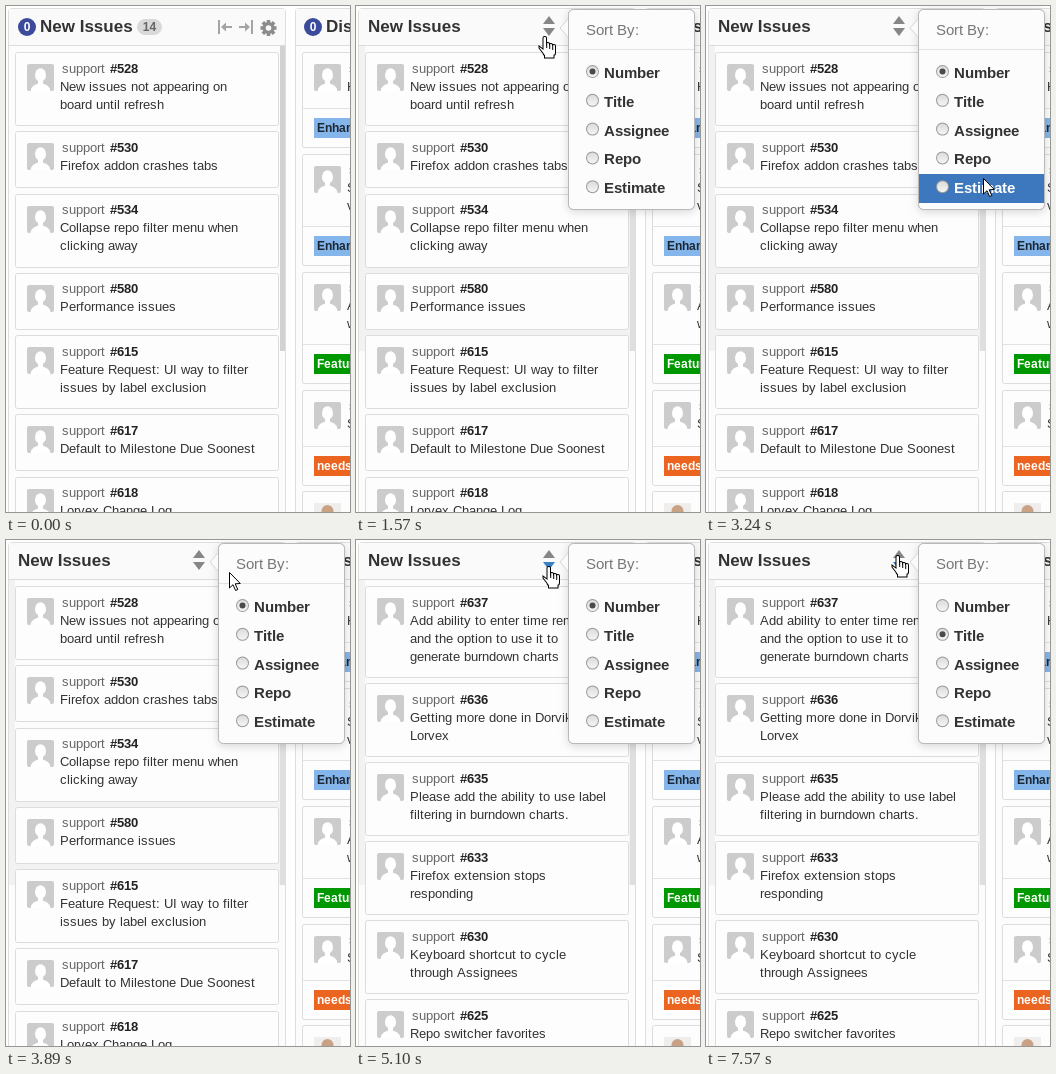
These frames come from a looping animation (344x506 px, 8000 ms). An HTML page with a canvas:

```html
<!DOCTYPE html>
<html lang="en">
<head>
<meta charset="utf-8">
<title>Sorting issues on a board</title>
<style>
html, body { margin: 0; width: 100%; height: 100%; overflow: hidden; background: #fff; }
canvas { display: block; }
</style>
</head>
<body>
<canvas id="stage" width="344" height="506"></canvas>
<script>
const ctx = document.getElementById('stage').getContext('2d');
const FONT = '"Liberation Sans", Arial, sans-serif';
const LOOP = 8000, TICK = 120;
const HOVER_AT = 800, POPUP_AT = 1570, RESORT_AT = 5100, SELECT_AT = 6550;
const ROW = 28.8;
const EDGE = '#dcdcdc', PAPER = '#fdfdfd', BLUE = '#3d77bd';

const ascending = [
  ['#528', 'New issues not appearing on', 'board until refresh'],
  ['#530', 'Firefox addon crashes tabs'],
  ['#534', 'Collapse repo filter menu when', 'clicking away'],
  ['#580', 'Performance issues'],
  ['#615', 'Feature Request: UI way to filter', 'issues by label exclusion'],
  ['#617', 'Default to Milestone Due Soonest'],
  ['#618', 'Lorvex Change Log']
];
const descending = [
  ['#637', 'Add ability to enter time remaining', 'and the option to use it to', 'generate burndown charts'],
  ['#636', 'Getting more done in Dorvik', 'Lorvex'],
  ['#635', 'Please add the ability to use label', 'filtering in burndown charts.'],
  ['#633', 'Firefox extension stops', 'responding'],
  ['#630', 'Keyboard shortcut to cycle', 'through Assignees'],
  ['#625', 'Repo switcher favorites']
];
const sideCards = [
  { lines: ['H'], label: 'Enhancement', fill: '#84b6eb', ink: '#1c2733' },
  { lines: ['S', 'v'], label: 'Enhancement', fill: '#84b6eb', ink: '#1c2733' },
  { lines: ['A', 'w'], label: 'Feature', fill: '#009800', ink: '#fff' },
  { lines: ['S'], label: 'needs', fill: '#eb6420', ink: '#fff' }
];
const options = ['Number', 'Title', 'Assignee', 'Repo', 'Estimate'];

// Pointer moves: start, end, target x, target y
const moves = [
  [660, 1570, 189, 30], [1570, 1720, 191, 27],
  [2190, 2550, 258, 72], [2550, 3240, 277, 172],
  [3260, 3890, 223, 32], [3920, 4160, 204, 17], [4190, 4670, 193, 26],
  [5380, 5620, 227, 31], [5650, 6130, 267, 106], [6280, 6400, 268, 99],
  [6860, 7110, 234, 27], [7140, 7260, 196, 17], [7450, 7570, 192, 15]
];

const pitch = lines => [62.5, 79, 97][lines.length - 1];
const easeOut = p => 1 - (1 - p) ** 3;

function pointerAt(t) {
  let x = 0, y = 70;
  for (const [start, end, toX, toY] of moves) {
    if (t < start) break;
    const stepped = Math.floor((t - start) / TICK) * TICK;
    const p = t >= end ? 1 : easeOut(stepped / (end - start));
    x += (toX - x) * p;
    y += (toY - y) * p;
  }
  return { x: Math.round(x), y: Math.round(y) };
}

function rect(x, y, w, h, color) {
  ctx.fillStyle = color;
  ctx.fillRect(x, y, w, h);
}

function box(x, y, w, h, r, fill, line) {
  ctx.beginPath();
  ctx.roundRect(x + .5, y + .5, w - 1, h - 1, r);
  ctx.fillStyle = fill;
  ctx.fill();
  ctx.strokeStyle = line;
  ctx.lineWidth = 1;
  ctx.stroke();
}

function oval(x, y, rx, ry, color) {
  ctx.beginPath();
  ctx.ellipse(x, y, rx, ry, 0, 0, Math.PI * 2);
  ctx.fillStyle = color;
  ctx.fill();
}

const disc = (x, y, r, color) => oval(x, y, r, r, color);

function poly(points, fill, line) {
  ctx.beginPath();
  points.forEach(([x, y]) => ctx.lineTo(x, y));
  ctx.closePath();
  ctx.fillStyle = fill;
  ctx.fill();
  if (!line) return;
  ctx.strokeStyle = line;
  ctx.lineWidth = 1;
  ctx.stroke();
}

function setFont(size, color, bold) {
  ctx.font = `${bold ? 'bold ' : ''}${size}px ${FONT}`;
  ctx.fillStyle = color;
}

// Body text advances by whole pixels, like hinted screen type
function text(str, x, y, size, color, bold) {
  setFont(size, color, bold);
  ctx.textAlign = 'left';
  for (const ch of str) {
    ctx.fillText(ch, x, y);
    x += Math.round(ctx.measureText(ch).width);
  }
}

function heading(str, x, size, color, align = 'left') {
  setFont(size, color, true);
  ctx.textAlign = align;
  ctx.fillText(str, x, size > 12 ? 26 : 25);
}

function avatar(x, y) {
  ctx.save();
  ctx.beginPath();
  ctx.roundRect(x, y, 27, 27, 2);
  ctx.clip();
  rect(x, y, 27, 27, '#ccc');
  oval(x + 13.5, y + 11, 5.5, 6.8, '#fff');
  rect(x + 11, y + 15, 5, 6, '#fff');
  oval(x + 13.5, y + 27, 10, 7.5, '#fff');
  ctx.restore();
}

function cardText(x, top, lines) {
  text('support', x + 2, top + 21, 13, '#666');
  lines.forEach((line, i) => text(line, x, top + 39 + i * 18, 13, '#333'));
}

function issues(list) {
  let y = 46;
  for (const [number, ...lines] of list) {
    const top = Math.round(y), base = Math.floor(y);
    box(9, top, 264, Math.floor(pitch(lines)) - 5, 2, PAPER, EDGE);
    avatar(21, top + 12);
    cardText(54, base, lines);
    text(number, 104, base + 21, 13, '#222', true);
    y += pitch(lines);
  }
}

function column(x, w) {
  box(x, 2, w, 520, 3, '#fcfcfc', '#dedede');
  rect(x + 1, 3, w - 2, 36, '#fafafa');
  rect(x, 39, w, 1, EDGE);
}

function countBadge(x) {
  disc(x, 21, 9, '#3b4a9b');
  heading('0', x, 12, '#fff', 'center');
}

function moveIcon(x, dir) {
  ctx.save();
  ctx.translate(x, 21);
  ctx.scale(dir, 1);
  rect(-7, -7, 2, 14, '#a4a4a4');
  rect(-1, -1, 8, 2, '#a4a4a4');
  poly([[-4, 0], [1, -4.5], [1, 4.5]], '#a4a4a4');
  ctx.restore();
}

function gear(x, y) {
  ctx.save();
  ctx.translate(x, y);
  for (let i = 0; i < 8; i++) {
    rect(-1.8, -8, 3.6, 4, '#8c8c8c');
    ctx.rotate(Math.PI / 4);
  }
  disc(0, 0, 6, '#8c8c8c');
  disc(0, 0, 2.8, '#fafafa');
  ctx.restore();
}

function sortArrow(baseY, dir, color) {
  poly([[187, baseY], [199, baseY], [193, baseY + dir * 8]], color);
}

function mainColumn(t) {
  const sorted = t >= RESORT_AT;
  column(2, 278);
  if (t >= HOVER_AT) rect(3, 40, 276, 305, '#f2f2f2');
  if (t >= POPUP_AT) rect(9, 40, 264, sorted ? 466 : 172, '#fcfcfc');
  rect(274, 40, 5, 305, t < POPUP_AT ? '#d2d2d2' : '#dfdfdf');
  issues(sorted ? descending : ascending);

  if (t >= POPUP_AT) {
    heading('New Issues', 12, 17, '#333');
    sortArrow(18, -1, '#868686');
    sortArrow(22, 1, sorted ? '#3a80c4' : '#868686');
    return;
  }
  countBadge(21);
  heading('New Issues', 34, 17, '#333');
  box(131, 13, 25, 16, 8, '#d9d9d9', '#d9d9d9');
  heading('14', 143.5, 12, '#666', 'center');
  moveIcon(219, 1);
  moveIcon(240, -1);
  gear(262.5, 22);
}

function sideColumn() {
  column(289, 90);
  countBadge(307);
  heading('Discussion', 320, 17, '#333');
  let y = 46;
  for (const { lines, label, fill, ink } of sideCards) {
    const top = Math.round(y), base = Math.floor(y);
    y += pitch(lines) + 39;
    const bottom = Math.floor(y) - 5;
    box(296, top, 70, bottom - top, 2, PAPER, EDGE);
    avatar(308, top + 12);
    cardText(341, base, lines);
    rect(297, bottom - 40, 60, 1, '#e2e2e2');
    rect(308, bottom - 30, 50, 20, fill);
    text(label, 311, bottom - 16, 12, ink, true);
  }
  box(296, y, 70, 60, 2, PAPER, EDGE);
  rect(308, y + 12, 27, 27, '#f0eeec');
  disc(321.5, y + 20, 6, '#c9a184');
}

function radio(x, y, on) {
  const shade = ctx.createLinearGradient(0, y - 6, 0, y + 6);
  shade.addColorStop(0, '#dadada');
  shade.addColorStop(1, '#f6f6f6');
  disc(x, y, 6.5, '#999');
  disc(x, y, 5.5, shade);
  if (on) disc(x, y, 3, '#4a4a4a');
}

function popup(t, mouse) {
  ctx.save();
  ctx.shadowColor = 'rgba(0,0,0,.14)';
  ctx.shadowBlur = 8;
  ctx.shadowOffsetY = 2;
  box(212, 3, 127, 201, 5, '#fcfcfc', '#bbb');
  ctx.restore();
  poly([[213, 12], [204, 22], [213, 32]], '#fafafa', '#d6d6d6');
  box(212, 3, 127, 201, 5, '#fcfcfc', '#b8b8b8');
  rect(213, 43, 125, 1, '#e2e2e2');
  text('Sort By:', 230, 29, 15, '#777');

  const hovered = mouse.x >= 213 ? Math.floor((mouse.y - 53) / ROW) : -1;
  const selected = t < SELECT_AT ? 0 : 1;
  options.forEach((name, i) => {
    const top = Math.round(53 + i * ROW);
    if (i === hovered) rect(213, top, 125, 29, BLUE);
    radio(236.5, 65.5 + i * ROW, i === selected);
    text(name, 248, Math.round(72 + i * ROW), 15, i === hovered ? '#fff' : '#333', true);
  });
}

function arrowCursor() {
  poly([[.5, .5], [.5, 16], [4, 12.7], [6.6, 18.5], [8.8, 17.5], [6.2, 11.8], [11.3, 11.5]], '#fff', '#000');
}

function handCursor() {
  const shape = new Path2D();
  shape.roundRect(-1.5, 1, 2.5, 14, 1);
  for (let i = 1; i <= 3; i++) shape.roundRect(3 * i - 1.5, 6 + i, 2.5, 8, 1);
  shape.roundRect(-1.5, 10, 11.5, 9, 2);
  shape.rect(0, 15, 8.5, 6.5);
  const thumb = new Path2D('M-5.5 11L-1.5 14V17L0 19L-5.5 12Z');
  shape.addPath(thumb);
  ctx.lineWidth = 2;
  ctx.strokeStyle = '#000';
  ctx.stroke(shape);
  ctx.fillStyle = '#fff';
  ctx.fill(shape);
  for (let i = 0; i < 3; i++) rect(1.2 + 3 * i, 7 + i, 1, 5, '#000');
}

function draw(t) {
  const mouse = pointerAt(t);
  rect(0, 0, 344, 506, '#fff');
  mainColumn(t);
  sideColumn();
  if (t >= POPUP_AT) popup(t, mouse);
  if (t < moves[0][0]) return;
  const overArrows = t >= POPUP_AT && mouse.x < 196;
  ctx.save();
  ctx.translate(mouse.x, mouse.y);
  overArrows ? handCursor() : arrowCursor();
  ctx.restore();
}

const start = performance.now();
function tick() {
  draw((performance.now() - start) % LOOP);
  requestAnimationFrame(tick);
}
tick();
</script>
</body>
</html>
```
